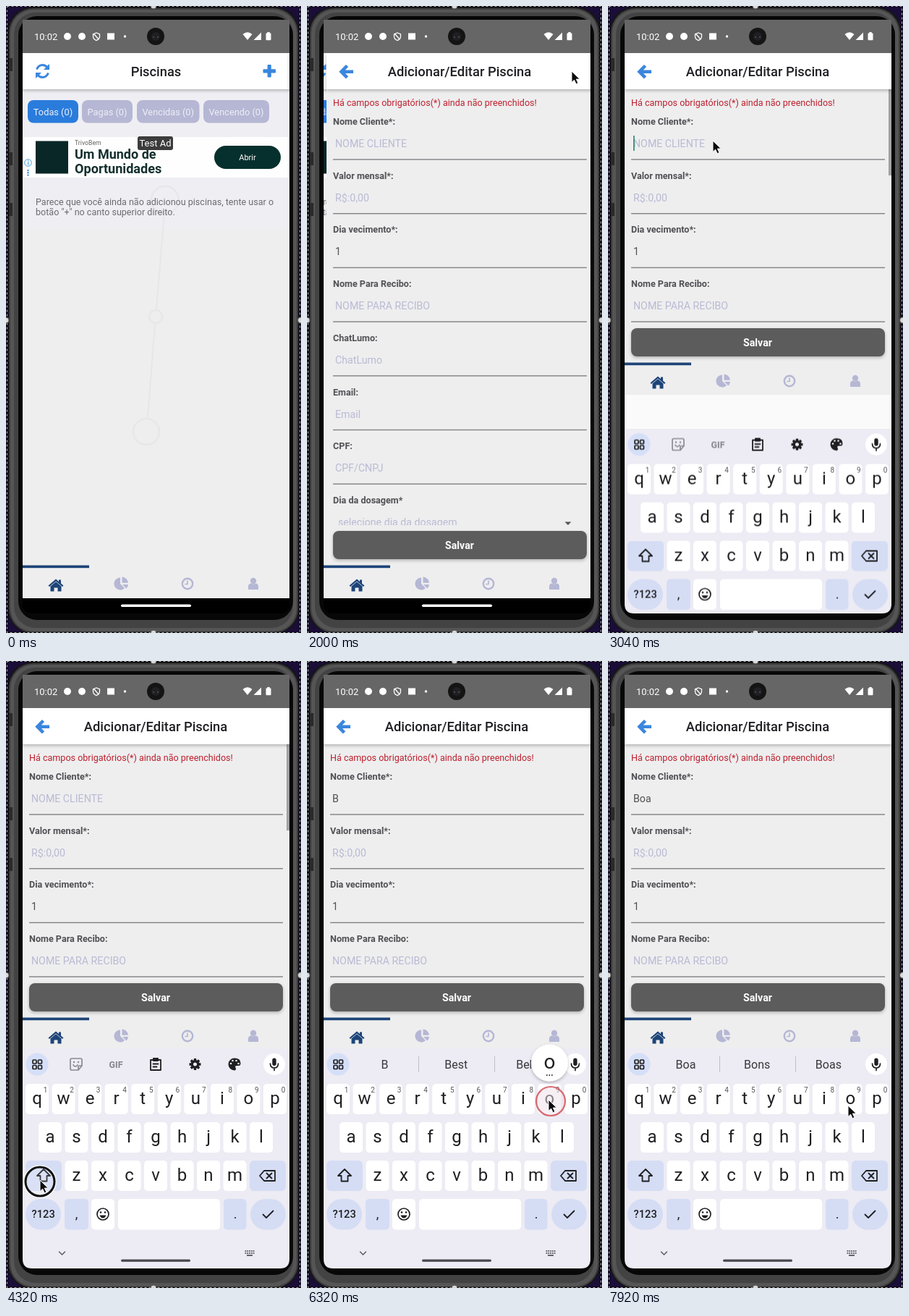
An HTML page for the animation above (8000 ms loop, 408 px wide and 866 px high).

```html
<!DOCTYPE html>
<html lang="pt">
<head>
<meta charset="utf-8">
<title>Piscinas</title>
<style>
html, body { margin: 0; width: 100%; height: 100%; overflow: hidden; background: #1a0d38; }
svg { display: block; width: 408px; height: 866px; font-family: Roboto, Arial, sans-serif; }
.mid { text-anchor: middle; }
.med { font-weight: 500; }
.bold { font-weight: 700; }
.line { fill: none; stroke-linecap: round; stroke-linejoin: round; }
</style>
</head>
<body>
<svg id="stage" viewBox="0 0 408 866" xmlns="http://www.w3.org/2000/svg"></svg>
<script>
const LOOP = 8000;
const stage = document.getElementById('stage');
const $ = id => document.getElementById(id);

// Drawing helpers
const rect = (x, y, w, h, fill, r = 0, more = '') =>
  `<rect x="${x}" y="${y}" width="${w}" height="${h}" rx="${r}" fill="${fill}" ${more}/>`;
const circ = (x, y, r, fill, more = '') => `<circle cx="${x}" cy="${y}" r="${r}" fill="${fill}" ${more}/>`;
const path = (d, fill, more = '') => `<path d="${d}" fill="${fill}" ${more}/>`;
const line = (d, color, w, more = '') => `<path class="line" d="${d}" stroke="${color}" stroke-width="${w}" ${more}/>`;
const text = (s, x, y, size, fill, cls = '') =>
  `<text x="${x}" y="${y}" font-size="${size}" fill="${fill}" class="${cls}">${s}</text>`;
const group = (id, body, more = '') => `<g id="${id}" ${more}>${body}</g>`;
const at = (x, y, body) => `<g transform="translate(${x} ${y})">${body}</g>`;

const BLUE = '#3a86de', NAVY = '#1d4478', LILAC = '#b5b7d4', PAGE = '#eeeeef', INK = '#1f1f22';

function phone() {
  return rect(0, 0, 408, 866, '#1a0d38')
    + rect(1, 1, 406, 866, '#161518', 36)
    + rect(4, 3, 400, 863, '#3c3c3d', 34)
    + rect(6, 5, 396, 859, '#555556', 32)
    + rect(11, 9, 386, 850, '#434344', 30)
    + rect(17, 14, 374 + 6, 834, '#070707', 26)
    + [72, 202, 272].map(y => rect(4, y, 5, 18, '#2a2a2b')).join('')
    + rect(1.5, .5, 405, 865, 'none', 0, 'stroke="#000" stroke-width="1.5"')
    + rect(1.5, .5, 405, 865, 'none', 0, 'stroke="#b5b5b5" stroke-width="1" stroke-dasharray="3 3"')
    + [[204, 0], [0, 434], [407.5, 434], [204, 866]].map(([x, y]) =>
      circ(x, y, 4, '#d8d8d8', 'stroke="#555" stroke-width="1"')).join('');
}

function statusBar() {
  return rect(23, 19, 369, 46, '#666')
    + text('10:02', 39, 46.7, 13, '#fff')
    + circ(85, 42, 5, '#fff') + circ(105, 42, 5, '#fff')
    + line('M125 37l4.5 1.8v3.4q0 3.5-4.5 5.4q-4.5-1.9-4.5-5.4v-3.4zM122 39l6 7', '#fff', 1.3)
    + rect(140, 37.5, 10, 9, '#fff') + circ(164.5, 42, 1.7, '#fff')
    + circ(207, 42, 12, '#141414') + circ(207, 42, 6, '#202024')
    + circ(204, 43, 1, '#555') + circ(210, 43, 1, '#555')
    + path('M327.5 39q6.5-5.5 13 0l-6.5 8zM353 36.5v10.5h-10.5z', '#fff')
    + rect(359.5, 37.5, 7, 9.8, '#fff', 1) + rect(361.3, 36, 3.4, 3, '#fff');
}

const header = body => rect(23, 65, 369, 50, '#fff', 0, 'filter="url(#soft)"') + rect(23, 65, 369, 49, '#fff') + body;

function listPage() {
  const chips = [['Todas (0)', 30, 70, '#2a7cdc'], ['Pagas (0)', 105, 70, LILAC],
    ['Vencidas (0)', 181, 86.5, LILAC], ['Vencendo (0)', 273, 91, LILAC]];
  return rect(23, 65, 369, 708, PAGE) + rect(23, 115, 369, 193, '#efeef3')
    + group('trail', line('M219 287L208 418M206 440L196 568', '#dedee0', 2)
      + [[220, 268, 19], [207, 429, 9], [194, 588, 18]].map(([x, y, r]) =>
        circ(x, y, r, 'none', 'stroke="#dfdfe1" stroke-width="2.5"')).join(''))
    + header(text('Piscinas', 207.5, 96.7, 18.3, '#202024', 'mid med')
      + line('M42.5 87.5q2.5-6 8-6q4 0 7 3.5M58.5 92.5q-2.5 6-8 6q-4 0-7-3.5', BLUE, 3, 'style="stroke-linecap:butt"')
      + path('M60 80v8h-8zM41 100v-8h8z', BLUE)
      + rect(355.5, 87.2, 17.5, 5.2, BLUE, 1) + rect(361.6, 81, 5.2, 17.5, BLUE, 1))
    + chips.map(([s, x, w, c]) => rect(x, 130, w, 31.5, c, 8) + text(s, x + w / 2, 151, 12.8, '#eeeef7', 'mid')).join('')
    + rect(23, 181, 368, 56, '#fefefe')
    + rect(41, 186.5, 45, 45, '#0a2727')
    + text('TrivoBem', 95, 191.5, 8.7, '#666')
    + text('Um Mundo de', 95, 211, 18, '#14302e', 'bold')
    + text('Oportunidades', 95, 230.5, 18.1, '#14302e', 'bold')
    + rect(182, 180, 49, 19, '#3c3c3c', 3) + text('Test Ad', 206.5, 194.3, 13, '#fff', 'mid')
    + rect(288, 193, 92, 32, '#06302d', 16) + text('Abrir', 334, 213, 11, '#fff', 'mid')
    + circ(30.5, 216.5, 4.8, '#fff', 'stroke="#3f9ad8" stroke-width="1"')
    + rect(30, 215.5, 1.2, 4, '#3f9ad8') + rect(30, 213.3, 1.2, 1.3, '#3f9ad8')
    + [227, 230.3, 233.6].map(y => circ(30.5, y, 1.2, '#3f8ad8')).join('')
    + text('Parece que você ainda não adicionou piscinas, tente usar o', 41, 274.8, 12.56, '#6c6c70')
    + text('botão "+" no canto superior direito.', 41, 289.3, 12.56, '#6c6c70');
}

function formPage() {
  const rows = [['Nome Cliente*:', ''], ['Valor mensal*:', 'R$:0,00'], ['Dia vecimento*:', '1'],
    ['Nome Para Recibo:', 'NOME PARA RECIBO'], ['ChatLumo:', 'ChatLumo'], ['Email:', 'Email'],
    ['CPF:', 'CPF/CNPJ'], ['Dia da dosagem*', 'selecione dia da dosagem']];
  const hint = '#b9bad3', ink = '#505054';
  const typed = [['NOME CLIENTE', hint], ['B', ink], ['Bo', ink], ['Boa', ink]];
  return rect(23, 65, 369, 708, PAGE)
    + rows.map(([label, value], i) => {
      const y = 164 + i * 74.7;
      return text(label, 32, y, 12.6, ink, 'bold')
        + text(value, i == 7 ? 39 : 35, y + 31, 14.2, i == 2 ? ink : hint)
        + rect(32, y + 47.3, 351, 1.4, '#828285');
    }).join('')
    + path('M352.5 712.5h9l-4.5 4.5z', '#555')
    + typed.map(([s, c], i) => group('typed' + i, text(s, 35, 195, 14.2, c))).join('')
    + group('caret', rect(35, 179, 1.7, 21, '#2f8f70'))
    + group('scroll', rect(388, 115, 4, 119, '#a3a3a5'))
    + text('Há campos obrigatórios(*) ainda não preenchidos!', 32, 137.6, 12.57, '#bd1f2c')
    + header(text('Adicionar/Editar Piscina', 207, 96.7, 18.35, '#202024', 'mid med')
      + line('M51.5 82.5l-8 8.2l8 8.2M44 90.7h16', BLUE, 4.6, 'style="stroke-linecap:butt;stroke-linejoin:miter"'))
    + group('save', rect(23, 717, 369, 56, PAGE)
      + rect(32, 725, 351, 39, '#5b5b5c', 8, 'filter="url(#soft)"')
      + text('Salvar', 207, 750, 14.2, '#fff', 'mid bold'));
}

function tabs() {
  return rect(23, 773, 369, 45, PAGE) + rect(23, 772.5, 92, 3.7, NAVY)
    + path('M58.5 800.5l10.5-9l4 3.4v-2.4h3v5l3.5 3l-1.5 1.6l-9-7.7l-9 7.7z', NAVY)
    + path('M61.5 801.5l7.5-6.3l7.5 6.3v7h-5v-5h-5v5h-5z', NAVY)
    + path('M158 789.5v8.5l6 6a8.5 8.5 0 1 1-6-14.5zM160.5 788.5a8.5 8.5 0 0 1 8.3 8.3h-8.3zM161 799h8a8.5 8.5 0 0 1-2.6 5.5z', LILAC)
    + circ(251, 798, 7.2, 'none', `stroke="${LILAC}" stroke-width="2.4"`) + line('M251 794v4.5h-3', LILAC, 1.7)
    + circ(342, 794, 4.2, LILAC) + path('M335 806v-4q0-4.5 4-4.5q3 2 6 0q4 0 4 4.5v4z', LILAC);
}

const TOP = [...'qwertyuiop'], MIDDLE = [...'asdfghjkl'], LOW = [...'zxcvbnm'];
const keyPos = {};
TOP.forEach((k, i) => keyPos[k] = [43 + i * 36.55, 605]);
MIDDLE.forEach((k, i) => keyPos[k] = [61 + i * 36.5, 658]);
LOW.forEach((k, i) => keyPos[k] = [97.5 + i * 36.5, 711]);

function toolbar() {
  const gear = Array.from({ length: 8 }, (_, i) => rect(-1.7, -8, 3.4, 4, INK, .5, `transform="rotate(${i * 45})"`)).join('');
  return at(97, 557, line('M-8-6q0-2 2-2h12q2 0 2 2v8l-5 6h-9q-2 0-2-2zM8 2h-3q-2 0-2 2v4M-4 1q3 4 6 0', '#8b8b91', 1.7)
      + circ(-3, -3, 1.2, '#8b8b91') + circ(3, -3, 1.2, '#8b8b91'))
    + text('GIF', 152, 561.5, 12.5, '#85858b', 'mid bold')
    + at(207, 557, line('M-7-6h14v14h-14zM-3.5-.5h7M-3.5 3.5h5', INK, 1.8) + rect(-4, -9, 8, 5, INK, 1))
    + at(261.5, 557, gear + circ(0, 0, 4.3, 'none', `stroke="${INK}" stroke-width="3.4"`))
    + at(316, 557, path('M0-8.5a8.5 8.5 0 1 0 0 17q2 0 2-2t-1-2.5q0-2 2-2h2.5q3 0 3-3.5q0-7-8.5-7z', INK)
      + [[-5, -1], [-2.5, -5], [2.5, -5], [5.5, -1]].map(([x, y]) => circ(x, y, 1.3, '#eceaf2')).join(''));
}

function keyboard() {
  const tint = '#d5ddf5', bg = '#edebf3';
  const letters = up => Object.entries(keyPos).map(([k, [x, y]]) =>
    text(up ? k.toUpperCase() : k, x, y + 7, 24, INK, 'mid')).join('');
  const words = [['B', 'Best', 'Belo'], ['Bo', 'Bom', 'Boi'], ['Boa', 'Bons', 'Boas']];
  return rect(23, 535, 369, 304, bg)
    + circ(43, 557, 15.5, '#d5dff8')
    + [[37, 551], [44.5, 551], [37, 558.5], [44.5, 558.5]].map(([x, y]) =>
      rect(x, y, 5, 5, 'none', 1, `stroke="${INK}" stroke-width="1.7"`)).join('')
    + group('tools', toolbar())
    + words.map((w, i) => group('words' + i, w.map((s, j) => text(s, 107.5 + j * 98.7, 563, 16, '#38383c', 'mid')).join('')
      + rect(154, 546, 1, 22, '#bfbec6') + rect(259, 546, 1, 22, '#bfbec6'))).join('')
    + circ(371, 557, 15, '#fff')
    + rect(368.3, 548.5, 5.4, 10.5, INK, 2.7) + line('M365.5 556q0 6 5.5 6t5.5-6M371 562v3.5', INK, 1.7)
    + Object.values(keyPos).map(([x, y]) => rect(x - 16, y - 21, 32, 42, '#fff', 5)).join('')
    + TOP.map((k, i) => text((i + 1) % 10, keyPos[k][0] + 11.5, 595.5, 10, '#55555a', 'mid')).join('')
    + group('lower', letters(false)) + group('upper', letters(true))
    + rect(27, 690, 50, 42, tint, 6) + rect(337, 690, 50, 42, tint, 6)
    + at(52, 711, line('M0-9l9 9h-4.5v7.5h-9V0H-9z', INK, 1.8))
    + at(362, 711, line('M-11 0l6-7h15v14h-15zM-1.5-3.5l7 7M5.5-3.5l-7 7', INK, 1.8))
    + rect(27, 743, 49, 42.5, tint, 21) + text('?123', 51.7, 769, 14.7, INK, 'mid med')
    + rect(81, 743, 33, 42.5, tint, 5) + text(',', 97.5, 770, 18, INK, 'mid')
    + rect(118, 743, 32, 42.5, '#fff', 5)
    + at(134, 764, circ(0, 0, 8, 'none', `stroke="${INK}" stroke-width="1.7"`)
      + circ(-3, -2.5, 1.3, INK) + circ(3, -2.5, 1.3, INK) + path('M-4.5 1.5h9q-1.5 4-4.5 4t-4.5-4z', INK))
    + rect(155, 743, 141, 42.5, '#fff', 5)
    + rect(301, 743, 31.5, 42.5, tint, 5) + text('.', 317, 770, 18, INK, 'mid')
    + rect(338, 743, 49, 42.5, tint, 21) + line('M355.5 764.5l4.5 4.5l9.5-9.5', INK, 1.8)
    + line('M73.5 816l4 4l4-4', '#55555a', 1.4)
    + rect(159, 826.5, 96, 3.2, '#47464b', 1.6)
    + [0, 1].map(r => [0, 1, 2, 3, 4].map(c => rect(330.5 + c * 2.8, 814 + r * 3, 1.8, 1.8, '#55555a')).join('')).join('')
    + rect(333, 820, 8, 1.8, '#55555a');
}

// Clicks: press time, release time, end of ring, tip x, tip y, popup letter
const clicks = [
  [1400, 1540, 1680, 364, 92], [2600, 2720, 2840, 145, 186], [4220, 4380, 4520, 47, 719],
  [5400, 5520, 5660, 245, 712, 'B'], [6120, 6260, 6400, 337, 608, 'o'], [6940, 7060, 7190, 58, 658, 'a']
];
const popup = k => {
  const [x, y] = keyPos[k.toLowerCase()];
  return circ(x, y - 50, 25.5, '#fff', 'filter="url(#soft)"')
    + text(k, x, y - 42, 28, INK, 'mid')
    + [-3.5, 0, 3.5].map(d => circ(x + d, y - 33, .9, INK)).join('');
};

stage.innerHTML = `<defs>
  <filter id="soft" x="-20%" y="-30%" width="140%" height="170%"><feDropShadow dx="0" dy="2" stdDeviation="2" flood-opacity=".25"/></filter>
  <clipPath id="screen"><path d="M23 19H392V826q0 13-13 13H36q-13 0-13-13z"/></clipPath></defs>`
  + phone()
  + `<g clip-path="url(#screen)">`
  + group('list', listPage()) + group('form', formPage()) + group('tabs', tabs())
  + rect(23, 818, 369, 22, '#000') + rect(159, 826.5, 97, 3.5, '#fff', 1.7)
  + group('gap', rect(23, 537, 369, 303, '#fafafa'))
  + group('keys', keyboard()) + statusBar() + '</g>'
  + clicks.map((c, i) => (c[5] ? group('pop' + i, popup(c[5])) : '')
    + group('down' + i, circ(c[3], c[4], 22, 'none', 'stroke="#fff" stroke-width="1.5"')
      + circ(c[3], c[4], 20, 'rgba(255,255,255,.12)', 'stroke="#111" stroke-width="3"'))
    + group('up' + i, circ(c[3], c[4], 20, 'rgba(238,226,232,.6)', 'stroke="#d3545c" stroke-width="2.2"'))).join('')
  + group('cursor', path('M0 0v15.5l3.6-3.3l2.6 5.6l2.8-1.3l-2.6-5.4h5z', '#0b0b0b', 'stroke="#fff" stroke-width="1"'));

// Motion: steps are [ms, value]; the first and last value fill the ends of the loop
function play(id, prop, steps, easing = 'linear') {
  const all = [[0, steps[0][1]], ...steps, [LOOP, steps.at(-1)[1]]];
  $(id).animate(all.map(([t, v]) => ({ offset: t / LOOP, [prop]: v, easing })),
    { duration: LOOP, iterations: Infinity });
}
const move = (id, steps, easing) =>
  play(id, 'transform', steps.map(([t, x, y]) => [t, `translate(${x}px, ${y}px)`]), easing);
const show = (id, from, to = LOOP) =>
  play(id, 'opacity', [[0, from ? 0 : 1], [from, 1], [to, to < LOOP ? 0 : 1]], 'step-end');

const slide = [[1680, 369], [1760, 230], [1840, 90], [1920, 22], [2000, 4], [2080, 0]];
move('form', slide.map(([t, x]) => [t, x, 0]));
move('list', slide.map(([t, x]) => [t, -34 * (1 - x / 369), 0]));
play('trail', 'opacity', [[0, .45], [80, .45], [800, 0]]);

const RESIZE = 2960;
for (const id of ['save', 'tabs']) move(id, [[0, 0, 0], [RESIZE, 0, -280]], 'step-end');
show('gap', RESIZE);
move('keys', [[2800, 0, 306], [2880, 0, 235], [2960, 0, 130], [3040, 0, 49], [3120, 0, 12], [3200, 0, 0]]);
play('scroll', 'opacity', [[RESIZE - 1, 0], [RESIZE, 1], [4640, 1], [4900, 0]]);

const typedAt = [5560, 6400, 7240];
show('typed0', 0, typedAt[0]);
show('tools', 0, typedAt[0]);
typedAt.forEach((t, i) => {
  show('typed' + (i + 1), t, typedAt[i + 1]);
  show('words' + i, t, typedAt[i + 1]);
});
play('lower', 'opacity', [[0, 1], [4440, 0], [typedAt[0], 1]], 'step-end');
show('upper', 4440, typedAt[0]);

const blink = [[0, 0]];
for (let t = 2760; t < typedAt[0]; t += 500) blink.push([t, blink.length % 2]);
play('caret', 'opacity', [...blink, [typedAt[0], 0]], 'step-end');

clicks.forEach(([a, b, c, , , key], i) => {
  show('down' + i, a, b);
  play('up' + i, 'opacity', [[b - 1, 0], [b, 1], [(b + c) / 2, .85], [c, 0]]);
  if (key) show('pop' + i, a + 30, c);
});

move('cursor', [
  [300, 430, 330], [520, 404, 262], [760, 366, 130], [960, 356, 102], [1260, 356, 102], [1400, 364, 92],
  [1800, 366, 90], [2160, 366, 90], [2320, 262, 126], [2480, 145, 186], [3440, 145, 186], [3520, 148, 246],
  [3600, 195, 616], [3760, 195, 616], [3960, 90, 694], [4160, 47, 717], [4640, 47, 717], [4960, 190, 722],
  [5240, 244, 711], [5640, 244, 711], [5880, 306, 640], [6060, 334, 606], [6440, 334, 606], [6660, 200, 630],
  [6860, 58, 656], [7180, 60, 645], [7280, 62, 637], [7440, 160, 630], [7640, 290, 618], [7800, 332, 614]
]);
</script>
</body>
</html>
```
